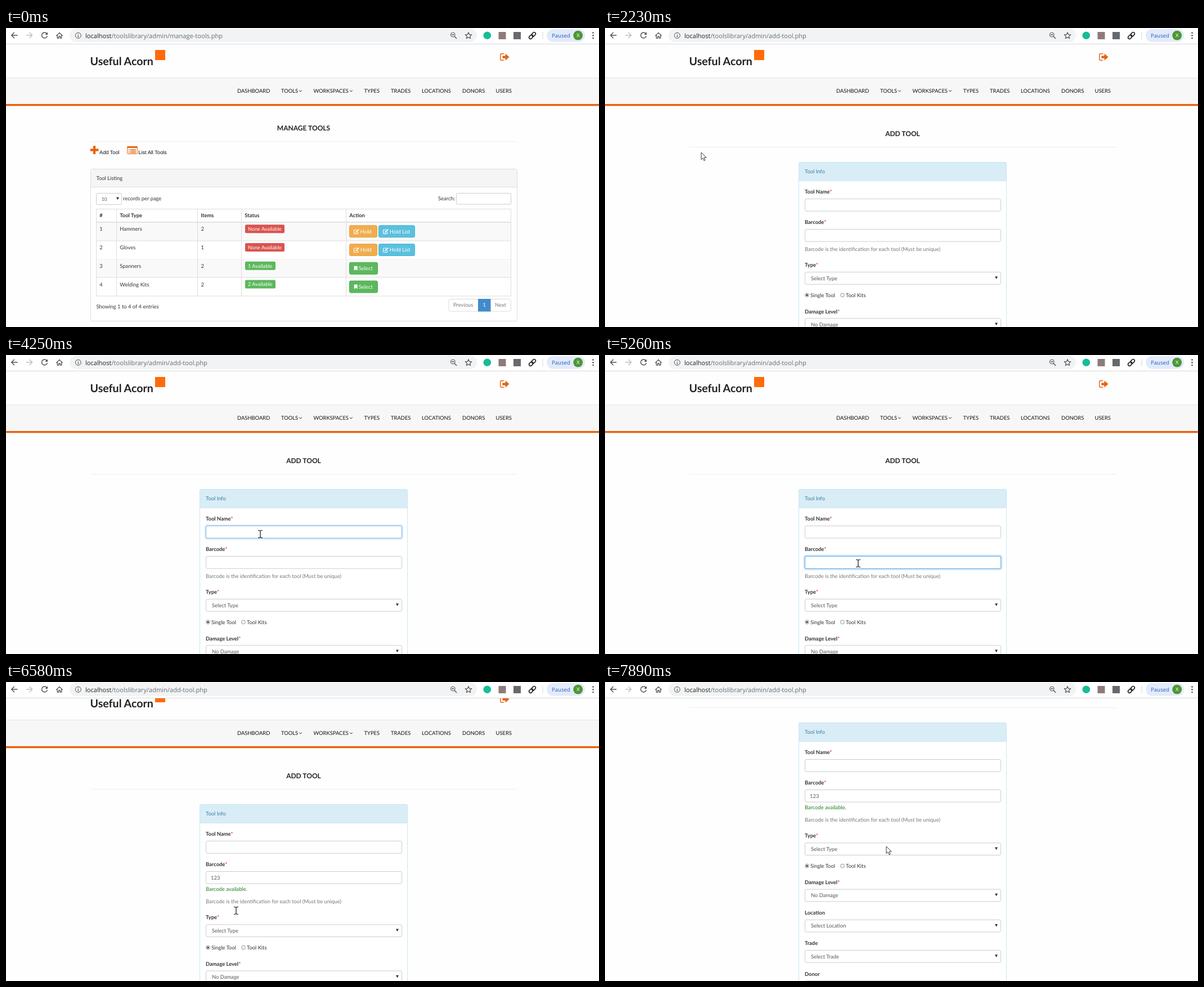
An HTML page for the animation above (8 s loop, 1054x531 px).

```html
<!DOCTYPE html>
<html lang="en">
<head>
<meta charset="utf-8">
<title>Tool library admin</title>
<style>
  html, body { margin: 0; width: 100%; height: 100%; overflow: hidden; background: #fefefe; }
  svg { display: block; width: 1054px; height: 531px; }
  text { font: 9.38px Lato, sans-serif; fill: #333; text-rendering: geometricPrecision; white-space: pre; }
  .b { font-weight: 700; }
  .title { font-size: 12px; font-weight: 700; text-anchor: middle; fill: #222; }
  .nav { fill: #111; }
  .brand { font-size: 19.6px; font-weight: 700; fill: #222; }
  .link { font: 9.2px "Liberation Sans", Arial, sans-serif; fill: #111; }
  .ui { font: 11.1px "Open Sans", sans-serif; fill: #6a6e72; }
  .badge { font-size: 9.15px; fill: #fff; }
  .w { fill: #fff; }
  .mute { fill: #777; }
  .val { fill: #555; }
  .info { fill: #3a7ca3; }
  .ok { fill: #1d7d1d; }
  .line { fill: none; stroke-linecap: round; stroke-linejoin: round; }
</style>
</head>
<body>
<svg id="stage" viewBox="0 0 1054 531"></svg>
<script>
const ORANGE = '#e8610c';

const text = (x, y, s, cls = '') => `<text x="${x}" y="${y}" class="${cls}">${s}</text>`;
const box = (x, y, w, h, fill, stroke = 'none', r = 0) =>
  `<rect x="${x}" y="${y}" width="${w}" height="${h}" rx="${r}" fill="${fill}" stroke="${stroke}"/>`;
const path = (d, fill, more = '') => `<path d="${d}" fill="${fill}" ${more}/>`;
const line = (d, color, w = 1) => `<path class="line" d="${d}" stroke="${color}" stroke-width="${w}"/>`;
const dot = (x, y, r, fill, stroke = 'none') =>
  `<circle cx="${x}" cy="${y}" r="${r}" fill="${fill}" stroke="${stroke}"/>`;
const group = (id, s) => `<g id="${id}">${s}</g>`;
const down = (x, y) => path(`M${x - 2.5} ${y - 2.5}h5l-2.5 4.8z`, '#333');

function browserBar() {
  const ink = '#4c4f53';
  return box(0, 0, 1054, 28, '#fff') + box(0, 28, 1054, 1, '#d9d9d9') +
    line('M20 13H10M14.5 8.3L9.8 13l4.7 4.7', ink, 1.4) +
    line('M36.5 13h10M42 8.3l4.7 4.7-4.7 4.7', '#bdbfc1', 1.4) +
    line('M72.3 9.6a5 5 0 1 0 .9 5.2', ink, 1.5) + path('M74 7.5v4.6h-4.6z', ink) +
    line('M89.6 13.6L95 8.4l5.4 5.2M91.3 12.4v5.8h2.4v-3.4h2.6v3.4h2.4v-5.8', ink, 1.3) +
    box(113, 1, 724, 24, '#f1f3f4', 'none', 12) +
    dot(128.3, 13.3, 5, 'none', ink) + line('M128.3 13v3M128.3 10.6v.1', ink, 1.2) +
    `<text x="141" y="17.5" class="ui"><tspan fill="#222">localhost</tspan>/toolslibrary/admin/<tspan id="file"></tspan></text>` +
    dot(794.3, 12, 3.9, 'none', ink) + line('M797.4 15.2l3.3 3.3M792.6 12h3.4', ink, 1.3) +
    line('M822 7.8l1.6 3.8 4.2.3-3.2 2.7 1 4-3.6-2.2-3.6 2.2 1-4-3.2-2.7 4.2-.3z', ink, 1.2) +
    dot(855.3, 13.3, 6.8, '#15bd97') + box(875.5, 7, 13, 13, '#8d7b79') + box(902, 7, 13, 13, '#66696d') +
    `<g transform="rotate(-45 935.5 13.5)" fill="none" stroke="#222" stroke-width="1.6">
      <rect x="928.3" y="10.9" width="8" height="5.2" rx="2.6"/><rect x="934.7" y="10.9" width="8" height="5.2" rx="2.6"/></g>` +
    box(953.5, 7, 1, 13, '#d5d8dc') +
    box(961, 2, 68, 22.5, '#e1ebfc', 'none', 11.2) +
    `<text x="970" y="17" class="ui" style="font-size:9.6px;fill:#2d5fb0">Paused</text>` +
    dot(1016.7, 13.2, 8.4, '#4f9632') +
    `<text x="1016.7" y="16.3" class="w" style="font-size:8.6px;text-anchor:middle">X</text>` +
    [8.6, 13.3, 18].map(y => dot(1043.5, y, 1.35, ink)).join('');
}

function siteHeader() {
  const items = [['DASHBOARD', 411], ['TOOLS', 489], ['WORKSPACES', 546.5], ['TYPES', 636.5],
    ['TRADES', 684], ['LOCATIONS', 739], ['DONORS', 811], ['USERS', 870.5]];
  return text(149.5, 66, 'Useful Acorn', 'brand') + box(265, 39, 18, 18, '#ff6b0a') +
    line('M884.5 45.7h-3.6a2.2 2.2 0 0 0-2.2 2.2v7.2a2.2 2.2 0 0 0 2.2 2.2h3.6', ORANGE, 1.4) +
    path('M882.4 49.4h5.2v-4l6.8 6.2-6.8 6.2v-4h-5.2z', ORANGE) +
    box(0, 88, 1054, 47.5, '#f7f7f7') + box(0, 88, 1054, 1, '#e5e5e5') + box(0, 135, 1054, 3.4, ORANGE) +
    items.map(([s, x]) => text(x, 115.2, s, 'nav')).join('') +
    [523.5, 613.5].map(x => line(`M${x - 2} 111l2 2 2-2`, '#111')).join('');
}

const editIcon = (x, y) =>
  line(`M${x + 5} ${y - 3.2}h-3.6a1.2 1.2 0 0 0-1.2 1.2v4.8a1.2 1.2 0 0 0 1.2 1.2h4.8a1.2 1.2 0 0 0 1.2-1.2v-1.6`, '#fff', 1.1) +
  line(`M${x + 3.8} ${y + 1.2}l4.5-4.5`, '#fff', 2);

function button(x, y, w, label, fill, edge) {
  const icon = label === 'Select'
    ? path(`M${x + 8.7} ${y + 7}h6v8.2l-3-2.6-3 2.6z`, '#fff')
    : editIcon(x + 8.3, y + 11.2);
  return box(x + .5, y + .5, w - 1, 21, fill, edge, 2.5) + icon +
    text(x + (label === 'Select' ? 16.8 : 19.8), y + 14.4, label, 'w');
}

function listPage() {
  const cols = [160.5, 196.5, 340.5, 418.5, 604.5, 897.5];
  const rows = [['Hammers', 2, 0], ['Gloves', 1, 0], ['Spanners', 2, 1], ['Welding Kits', 2, 2]];
  let s = text(529, 182, 'MANAGE TOOLS', 'title') + box(150, 201, 759, 1, '#eee') +
    path('M155 209.3h4.2v5.2h5.2v4.2h-5.2v5.2H155v-5.2h-5.2v-4.2h5.2z', ORANGE) + text(166, 224, 'Add Tool', 'link') +
    box(215.7, 210.7, 17.6, 12.8, 'none', ORANGE, 1.5) + box(215.5, 210, 18, 3, ORANGE) +
    [215.2, 217.9, 220.6].map(y => box(218, y, 1.6, 1.4, ORANGE) + box(220.8, y, 10.2, 1.4, ORANGE)).join('') +
    text(235.3, 224, 'List All Tools', 'link') +
    box(150.5, 250.5, 758, 270, '#fff', '#ddd', 3) + box(151, 251, 757, 31.5, '#f5f5f5', 'none', 2) +
    box(150, 282, 759, 1, '#ddd') + text(160.5, 269.8, 'Tool Listing') +
    box(160.5, 293.5, 45, 20, '#fff', '#ccc', 2) +
    `<text x="170" y="306.8" class="val" style="font-size:8.4px">10</text>` + down(198.5, 303) +
    text(208, 306, 'records per page') + text(768, 306, 'Search:') + box(800.5, 293.5, 97, 19.5, '#fff', '#ccc', 2);

  ['#', 'Tool Type', 'Items', 'Status', 'Action'].forEach((h, i) => s += text(cols[i] + 5.8, 336.3, h, 'b'));
  rows.forEach(([name, count, free], i) => {
    const y = 345 + i * 32.8;
    if (i % 2 === 0) s += box(160.5, y, 737, 32.8, '#f9f9f9');
    s += box(160.5, Math.round(y + 32.8) - .5, 737, 1, '#ddd') +
      text(166.3, y + 15.4, i + 1) + text(202.3, y + 15.4, name) + text(346.5, y + 15.4, count) +
      box(425, y + 4.2, free ? 54 : 70, 15, free ? '#5cb85c' : '#d9534f', 'none', 2.2) +
      text(430, y + 14.9, free ? free + ' Available' : 'None Available', 'badge');
    s += free ? button(610, y + 5.2, 51, 'Select', '#5cb85c', '#4cae4c')
      : button(610, y + 5.2, 50, 'Hold', '#f0ad4e', '#eea236') + button(662, y + 5.2, 65, 'Hold List', '#5bc0de', '#46b8da');
  });
  s += box(160, 321, 738, 1, '#ddd') + box(160, 344, 738, 1.6, '#ddd') +
    cols.map(x => box(x - .5, 321, 1, 155, '#ddd')).join('');

  return s + text(160.5, 497.6, 'Showing 1 to 4 of 4 entries') +
    box(787, 481.5, 110.5, 21.5, '#fff', '#ddd', 3) + box(839, 481, 22.5, 22.5, '#428bca') +
    text(795, 495.4, 'Previous', 'mute') + text(847.5, 495.4, '1', 'w') + text(869, 495.4, 'Next', 'mute');
}

const label = (y, s, must) => text(355, y, s + (must ? '<tspan fill="#e5431a">*</tspan>' : ''), 'b');
const input = y => box(355.5, y + .5, 348, 21.7, '#fff', '#ccc', 2.5);
const select = (y, s) => input(y) + text(366, y + 14.6, s, 'val') + down(695.5, y + 10.7);
const glow = (id, y) => group(id, [[4, .1], [2.6, .18], [1.2, .32]].map(([d, a]) =>
  box(355.5 - d, y + .5 - d, 348 + 2 * d, 21.7 + 2 * d, `rgba(102,175,233,${a})`, 'none', 2.5 + d)).join('') +
  box(355.5, y + .5, 348, 21.7, '#fff', '#66afe9', 2.5));

function formPage() {
  const radio = (x, on) => dot(x, 474.3, 3.5, '#f4f4f4', '#999') + (on ? dot(x, 474.3, 1.9, '#444') : '');
  const picks = [['Damage Level', 'No Damage', 1], ['Location', 'Select Location'],
    ['Trade', 'Select Trade'], ['Donor', 'Select Donor']];
  return text(529, 192, 'ADD TOOL', 'title') + box(150, 211, 759, 1, '#eee') +
    box(344.5, 238.5, 369, 600, '#fff', '#c9e7f2', 3) + box(344.5, 238.5, 369, 33, '#d9edf7', '#c9e7f2', 2.5) +
    text(355, 258.2, 'Tool Info', 'info') +
    label(294.3, 'Tool Name', 1) + input(303) + glow('nameGlow', 303) +
    label(348.2, 'Barcode', 1) + input(357) + glow('codeGlow', 357) +
    `<text id="code" x="364" y="371.8" class="val"></text>` +
    group('caret', box(0, 362.5, 1, 11.5, '#222')) +
    group('okMsg', text(355, 392.3, 'Barcode available.', 'ok')) +
    group('lower', text(355, 395.8, 'Barcode is the identification for each tool (Must be unique)', 'mute') +
      label(424, 'Type', 1) + select(433, 'Select Type') +
      radio(359, true) + text(365, 478.2, 'Single Tool') + radio(422, false) + text(428, 478.2, 'Tool Kits') +
      picks.map(([a, b, must], i) => label(506.7 + i * 54.2, a, must) + select(515.3 + i * 54.2, b)).join(''));
}

const pointers =
  group('arrow', path('M0 0V12.6L3 9.9L5 14.6L7.1 13.7L5.1 9.1H9.2Z', '#fff', 'stroke="#222" stroke-width=".9"')) +
  group('hand', path('M-1.2 1a1.2 1.2 0 0 1 2.4 0v4.2l5 1.2q1.2.4 1 2l-.9 5.8H-.8L-4.6 9q.6-1.8 2-.8l1.4 1.3z', '#fff',
    'stroke="#222" stroke-width=".9"')) +
  group('beam', line('M-3.5-6.5q3 0 3.5 1 .5-1 3.5-1M0-5.5v11M-3.5 6.5q3 0 3.5-1 .5 1 3.5 1', '#111', 1.2));

const stage = document.getElementById('stage');
stage.innerHTML = box(0, 0, 1054, 531, '#fefefe') +
  group('page', siteHeader() + group('list', listPage()) + group('form', formPage())) +
  browserBar() + group('cursor', pointers);
const el = {};
stage.querySelectorAll('[id]').forEach(n => el[n.id] = n);

// time, x, y, pointer shape from here on
const track = [
  [140, 776, 492, 'arrow'], [460, 400, 470, 'arrow'], [700, 169, 440, 'arrow'], [920, 354, 382, 'arrow'],
  [1090, 354, 382, 'arrow'], [1610, 193, 237, 'arrow'], [1850, 174, 224, 'hand'], [1930, 171, 222, 'hand'],
  [2160, 171, 221, 'arrow'], [3240, 171, 221, 'arrow'], [3320, 200, 233, 'arrow'], [3720, 400, 330, 'arrow'],
  [3900, 456, 362, 'beam'], [4090, 452, 318, 'beam'], [4180, 452, 318, 'beam'], [4410, 450, 376, 'beam'],
  [4560, 450, 376, 'beam'], [4640, 450, 370, 'beam'], [5700, 450, 370, 'beam'], [6120, 411, 404, 'beam'],
  [6280, 409, 406, 'beam'], [6740, 409, 406, 'beam'], [7040, 404, 338, 'arrow'], [7110, 404, 338, 'arrow'],
  [7500, 470, 274, 'arrow'], [7890, 500, 292, 'arrow']
];
const scrolls = [[0, 0], [6500, 4], [6580, 21], [6660, 75], [6740, 127], [6820, 148], [6900, 159], [6980, 164], [7040, 166]];
const typing = [[0, ''], [5340, '1'], [5490, '12'], [5580, '123']];

const LOOP = 8000, STEP = 80;
const last = (rows, t) => rows.filter(r => r[0] <= t).pop();
const show = (node, on) => node.style.display = on ? '' : 'none';
const move = (node, x, y) => node.setAttribute('transform', `translate(${x} ${y})`);
const ramp = (t, from, ms) => Math.min(1, Math.max(0, (t - from) / ms));

function drawCursor(t) {
  const a = last(track, t);
  show(el.cursor, a);
  if (!a) return;
  const b = track[track.indexOf(a) + 1] || a;
  const held = Math.floor((t - a[0]) / STEP) * STEP;
  const k = b === a ? 0 : held / (b[0] - a[0]);
  move(el.cursor, a[1] + (b[1] - a[1]) * k, a[2] + (b[2] - a[2]) * k);
  for (const shape of ['arrow', 'hand', 'beam']) show(el[shape], shape === a[3]);
}

function draw(t) {
  const code = last(typing, t)[1], checked = t >= 5800;
  el.file.textContent = t < 2000 ? 'manage-tools.php' : 'add-tool.php';
  show(el.list, t < 2160);
  show(el.form, t >= 2160);
  move(el.page, 0, -last(scrolls, t)[1]);
  el.nameGlow.style.opacity = ramp(t, 4140, 160) - ramp(t, 4540, 160);
  el.codeGlow.style.opacity = ramp(t, 4540, 160) - ramp(t, 5780, 160);
  el.code.textContent = code;
  show(el.caret, (t >= 4700 && t < 5260) || (t >= 5340 && t < 5800));
  move(el.caret, 364 + code.length * 5.45, 0);
  show(el.okMsg, checked);
  move(el.lower, 0, checked ? 18.3 : 0);
  drawCursor(t);
}

const start = performance.now();
function tick() {
  draw((performance.now() - start) % LOOP);
  requestAnimationFrame(tick);
}
tick();
</script>
</body>
</html>
```
